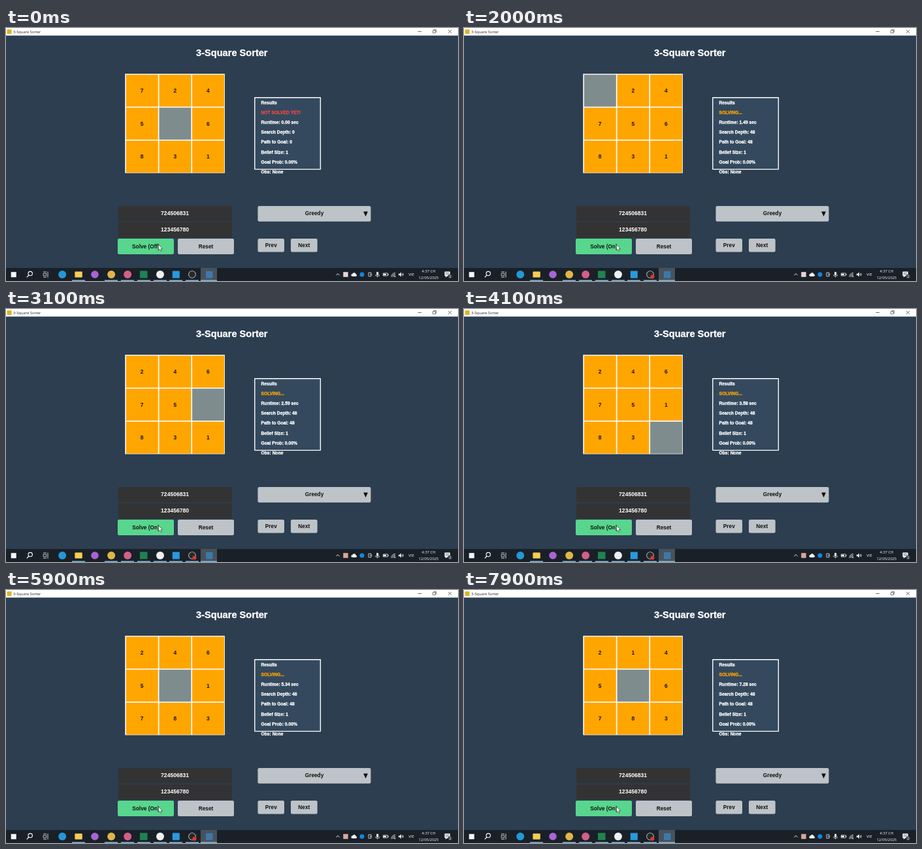
Animation, 692 px wide and 388 px high, one loop 8000 ms. Source, as an HTML page with a canvas:

```html
<!DOCTYPE html>
<html lang="en">
<head>
<meta charset="utf-8">
<title>3-Square Sorter</title>
<style>
html, body { margin: 0; width: 100%; height: 100%; overflow: hidden; background: #2c3e50; }
canvas { display: block; width: 692px; height: 388px; }
</style>
</head>
<body>
<canvas id="stage"></canvas>
<script>
const W = 692, H = 388, LOOP = 8000, STEP = 100, START = 500;
const NAME = '3-Square Sorter';
const BOLD = '"Liberation Sans", Arial, sans-serif';
const UI = '"Open Sans", "Noto Sans", sans-serif';
const WHITE = '#fff', ORANGE = '#ffa500', GRAY = '#bdc3c7';

const canvas = document.getElementById('stage');
const ctx = canvas.getContext('2d');
const ratio = window.devicePixelRatio || 1;
canvas.width = W * ratio;
canvas.height = H * ratio;
ctx.scale(ratio, ratio);

// Directions the blank travels, and when each step lands.
const PATH = 'LURRDDLLURRULD';
const MOVES = [1100, 1600, 2100, 2600, 3100, 3700, 4200, 4700, 5200, 5800, 6400, 6900, 7300, 7800];
const SHIFT = { L: -1, R: 1, U: -3, D: 3 };

// Stage time in ms against the seconds on the run clock.
const CLOCK = [[START, 0], [2000, 1.49], [3100, 2.59], [5100, 4.57], [5900, 5.34], [7200, 6.66], [7900, 7.28]];

function runtime(t) {
  if (t <= START) return 0;
  for (let i = 1; i < CLOCK.length; i++) {
    const [a, x] = CLOCK[i - 1], [b, y] = CLOCK[i];
    if (t <= b) return x + (y - x) * (t - a) / (b - a);
  }
  return CLOCK[CLOCK.length - 1][1];
}

function boardAt(t) {
  const cells = [...'724506831'];
  let blank = 4;
  MOVES.forEach((at, i) => {
    if (t < at) return;
    const next = blank + SHIFT[PATH[i]];
    cells[blank] = cells[next];
    cells[next] = '0';
    blank = next;
  });
  return cells;
}

function rect(x, y, w, h, color) {
  ctx.fillStyle = color;
  ctx.fillRect(x, y, w, h);
}

function round(x, y, w, h, r, color) {
  ctx.fillStyle = color;
  ctx.beginPath();
  ctx.roundRect(x, y, w, h, r);
  ctx.fill();
}

function disc(x, y, r, color) {
  ctx.fillStyle = color;
  ctx.beginPath();
  ctx.arc(x, y, r, 0, Math.PI * 2);
  ctx.fill();
}

function poly(points, color) {
  ctx.fillStyle = color;
  ctx.beginPath();
  points.forEach(([x, y]) => ctx.lineTo(x, y));
  ctx.closePath();
  ctx.fill();
}

function line(points, color, width = 1) {
  ctx.strokeStyle = color;
  ctx.lineWidth = width;
  ctx.beginPath();
  points.forEach(([x, y], i) => i ? ctx.lineTo(x, y) : ctx.moveTo(x, y));
  ctx.stroke();
}

function frame(x, y, w, h, color, width) {
  ctx.strokeStyle = color;
  ctx.lineWidth = width;
  ctx.strokeRect(x, y, w, h);
}

function text(str, x, y, size, color, opt = {}) {
  const { align = 'center', font = BOLD, weight = 'bold', heavy = 0 } = opt;
  ctx.font = `${weight} ${size}px ${font}`;
  ctx.textAlign = align;
  ctx.textBaseline = 'alphabetic';
  ctx.fillStyle = color;
  ctx.fillText(str, x, y + size * 0.35);
  if (heavy) {
    ctx.strokeStyle = color;
    ctx.lineWidth = heavy;
    ctx.lineJoin = 'round';
    ctx.strokeText(str, x, y + size * 0.35);
  }
}

function button(x, y, w, h, label, color = GRAY) {
  round(x, y, w, h, 2.2, color);
  text(label, x + w / 2, y + h / 2 - 0.4, 8.3, '#111');
}

function titleBar() {
  rect(0, 0, W, 11.6, WHITE);
  rect(1.5, 2.2, 7, 7, '#d9b32c');
  text(NAME, 11, 6, 5.8, '#222', { align: 'left', font: UI, weight: 'normal' });
  line([[630.5, 5.5], [636, 5.5]], '#444', 0.8);
  frame(653.5, 3.8, 3.8, 3.8, '#444', 0.7);
  line([[654.8, 3.6], [654.8, 2.6], [658.6, 2.6], [658.6, 6.4], [657.6, 6.4]], '#444', 0.7);
  line([[677, 2.9], [682, 7.9]], '#444', 0.8);
  line([[682, 2.9], [677, 7.9]], '#444', 0.8);
}

function board(t) {
  const pitch = 50.6;
  rect(182.3, 70.2, 152.6, 152.3, WHITE);
  boardAt(t).forEach((n, i) => {
    const x = 183.9 + (i % 3) * pitch, y = 71.6 + Math.floor(i / 3) * pitch;
    rect(x, y, 48.9, 49, n === '0' ? '#7f8c8d' : ORANGE);
    if (n !== '0') text(n, x + 24.3, y + 24.4, 8.5, '#1c1400');
  });
}

function results(t) {
  const on = t >= START, depth = on ? 48 : 0;
  rect(380, 106, 102, 111, '#34495e');
  frame(380.8, 106.8, 100.6, 109.8, WHITE, 1.4);
  const rows = [
    'Results',
    on ? 'SOLVING...' : 'NOT SOLVED YET!',
    `Runtime: ${runtime(t).toFixed(2)} sec`,
    `Search Depth: ${depth}`,
    `Path to Goal: ${depth}`,
    'Belief Size: 1',
    'Goal Prob: 0.00%',
    'Obs: None'
  ];
  rows.forEach((s, i) => {
    const color = i !== 1 ? WHITE : on ? ORANGE : '#f0483e';
    text(s, 390.4, 114.6 + i * 15.12, 6.75, color, { align: 'left', heavy: 0.3 });
  });
}

function controls(t) {
  [['724506831', 273], ['123456780', 298]].forEach(([s, y]) => {
    round(172, y, 174, 23.6, 1.5, '#333');
    text(s, 258.6, y + 11.2, 8.6, WHITE);
  });
  button(171, 323, 86, 24, t >= START ? 'Solve (On)' : 'Solve (Off)', '#58d68d');
  button(263, 323, 86, 24, 'Reset');
  button(385.5, 323, 40.5, 20.5, 'Prev');
  button(436, 323, 40.7, 20.5, 'Next');
  button(385.5, 273, 173, 23.8, 'Greedy');
  poly([[547.2, 281.5], [554, 281.5], [550.6, 289]], '#0b0b0b');
}

function pointer() {
  const shape = [[233.5, 332.2], [233.5, 341], [235.5, 339.2], [236.9, 342.2], [238.3, 341.5], [237, 338.6], [239.5, 338.4]];
  poly(shape, WHITE);
  line([...shape, shape[0]], '#222', 0.6);
}

function apps(t) {
  rect(298, 368, 25, 20, '#48525c');
  rect(7.7, 374.2, 8, 8, '#f4f6f8');

  ctx.strokeStyle = WHITE;
  ctx.lineWidth = 1.1;
  ctx.beginPath();
  ctx.arc(37.2, 376.6, 3.2, 0, Math.PI * 2);
  ctx.stroke();
  line([[34.9, 379], [31.8, 382.4]], WHITE, 1.2);

  frame(57.2, 376.2, 4.4, 3.8, '#e6e8ea', 0.8);
  line([[57, 374], [62, 374]], '#e6e8ea', 0.8);
  line([[57, 382.2], [62, 382.2]], '#e6e8ea', 0.8);
  line([[64, 373.6], [64, 382.6]], '#e6e8ea', 0.9);

  disc(86.2, 378, 6, '#2498d5');
  round(105.4, 373.5, 11.4, 9, 1, '#f5cd55');
  disc(136, 378, 5.8, '#a765d3');
  disc(161.2, 378, 6, '#dfb646');
  disc(186.2, 378, 6, '#d45f88');
  rect(205, 372.5, 11.5, 11, '#20834f');
  disc(236, 378, 6, '#eef0f4');
  rect(254.8, 372.6, 11, 11, '#289ade');
  disc(285, 378, 5.8, '#d0d3d6');
  disc(285, 378, 4.9, '#25282c');
  if (t >= START) disc(288.5, 381.5, 3, '#e3342f');
  rect(306, 373, 10.5, 10.5, '#3d78a9');

  [101, 151, 176, 201, 226, 250, 275].forEach(x => rect(x, 386.5, 20, 1.5, '#83b9dc'));
  rect(298, 386.5, 25, 1.5, '#83b9dc');
}

function tray(t) {
  const ink = '#edf0f2';
  line([[505.4, 379.4], [508, 376.6], [510.6, 379.4]], ink, 0.9);
  rect(516.3, 374.2, 7.4, 7.6, t < 2800 ? '#e8d5d6' : '#d9a79b');

  disc(530.4, 379, 2, ink);
  disc(533, 377.8, 2.6, ink);
  disc(535.3, 379.2, 1.8, ink);
  rect(530.4, 379, 5, 2, ink);

  disc(545, 378, 3.5, '#1685d9');
  frame(555, 375.2, 4, 5.6, ink, 0.8);
  line([[557, 378], [560.5, 378]], ink, 0.8);
  round(567.2, 373.8, 3, 5.4, 1.5, ink);
  line([[566, 378], [566, 380.2], [571.4, 380.2], [571.4, 378]], ink, 0.7);
  line([[568.7, 380], [568.7, 382.4]], ink, 0.8);

  frame(577.4, 376, 7, 4, ink, 0.8);
  rect(578, 376.8, 4, 2.4, ink);
  rect(584.6, 377, 1, 2, ink);

  ctx.strokeStyle = ink;
  ctx.lineWidth = 0.9;
  for (let r = 2; r <= 6; r += 2) {
    ctx.beginPath();
    ctx.arc(596, 381.6, r, Math.PI, Math.PI * 1.5);
    ctx.stroke();
  }
  disc(595.6, 381.2, 0.8, ink);

  poly([[601, 376.7], [602.8, 376.7], [605, 374.6], [605, 381.4], [602.8, 379.3], [601, 379.3]], ink);
  [1.6, 3.2].forEach(r => {
    ctx.beginPath();
    ctx.arc(605, 378, r, -0.8, 0.8);
    ctx.stroke();
  });

  const ui = { font: UI, weight: 'normal' };
  text('VIE', 620.5, 378, 5.9, WHITE, ui);
  text('4:37 CH', 647, 373.2, 5.8, WHITE, ui);
  text('12/05/2025', 647, 382.8, 5.75, WHITE, ui);
  round(671.5, 373.5, 8.4, 7, 0.8, ink);
  poly([[673, 380], [676, 380], [673, 382.6]], ink);
  line([[673, 375.7], [678.3, 375.7]], '#394149', 0.6);
  line([[673, 377.8], [678.3, 377.8]], '#394149', 0.6);
  disc(680, 381, 3.3, '#39424b');
  text('2', 680, 381, 5, WHITE, ui);
}

function draw(t) {
  rect(0, 0, W, H, '#2c3e50');
  titleBar();
  text(NAME, 345.8, 38, 14.6, WHITE, { heavy: 0.3 });
  board(t);
  results(t);
  controls(t);
  pointer();
  rect(0, 368, W, 20, '#192028');
  apps(t);
  tray(t);
}

const begin = performance.now();
function tick() {
  const t = (performance.now() - begin) % LOOP;
  draw(Math.floor(t / STEP) * STEP);
  requestAnimationFrame(tick);
}
tick();
</script>
</body>
</html>
```
